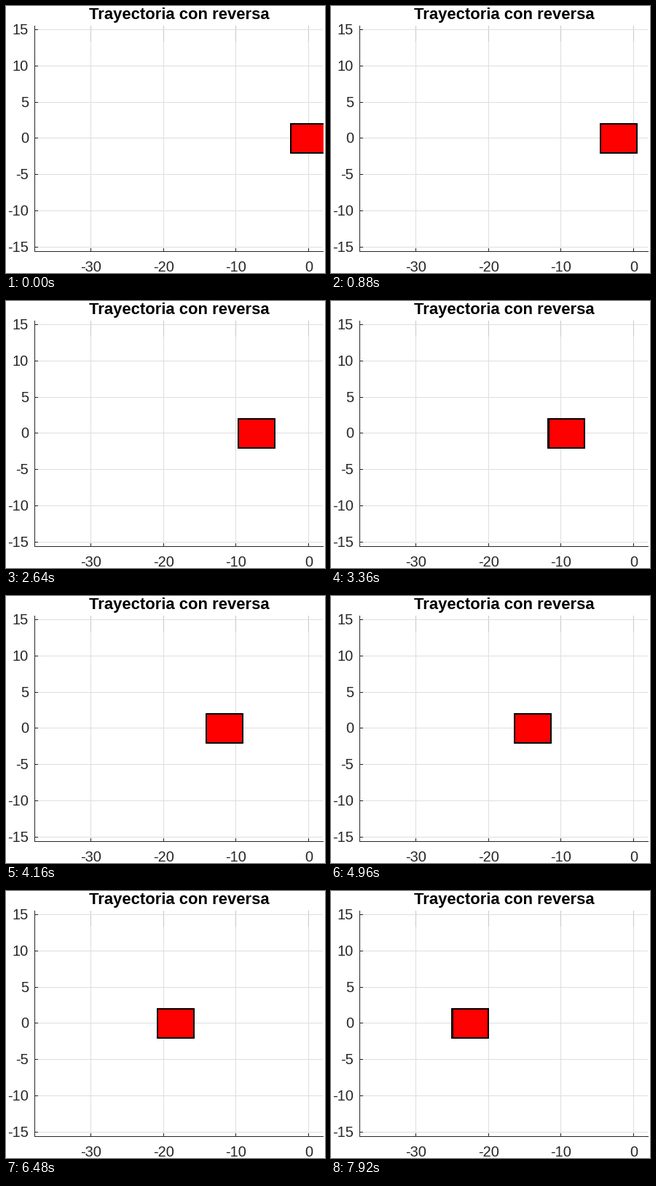
Write a matplotlib script that moves like this. It is 438 by 367 pixels and loops after 8000 ms.

```python
from math import floor

import matplotlib.pyplot as plt
from matplotlib.animation import FuncAnimation
from matplotlib.patches import Rectangle

W, H, DPI = 438, 367, 64
PT = 72 / DPI                      # points per pixel
FRAMES, INTERVAL = 100, 80
SCALE = 9.97                       # pixels per data unit
LEFT, TOP, RIGHT, BOTTOM = 39, 27, 435, 337
INK, GRID, GRID_TOP = "#262626", "#dedede", "#c8c8c8"
CAR_X, CAR_Y = 415.95, 182.14      # screen position of the car at the start
CAR_W, CAR_H = 5 * SCALE, 4 * SCALE
STEP = 23 / 99 * SCALE             # 23 units of reverse in 99 steps

plt.rcParams["font.family"] = "Liberation Sans"
fig = plt.figure(figsize=(W / DPI, H / DPI), dpi=DPI, facecolor="white")
ax = fig.add_axes([0, 0, 1, 1])
ax.set_xlim(0, W)
ax.set_ylim(H, 0)
ax.axis("off")


def bar(x, y, w, h, color, z):
    ax.add_patch(Rectangle((x, y), w, h, fc=color, lw=0,
                           antialiased=False, zorder=z))


def label(x, y, text, size=20, color=INK, **kw):
    ax.text(x, y, text, fontsize=size * PT, color=color, va="baseline", **kw)


for v in range(-30, 1, 10):
    x = floor(415.5 + v * SCALE)
    bar(x, TOP, 1, BOTTOM - TOP, GRID, 1)
    bar(x, TOP, 1, 22, GRID_TOP, 1)
    bar(x, BOTTOM - 4, 1, 4, INK, 4)
    label(x + 0.5, 365, str(v), ha="center")

for v in range(-15, 16, 5):
    y = floor(181.9 - v * SCALE)
    bar(LEFT, y, RIGHT - LEFT, 1, GRID, 1)
    bar(LEFT, y, 5, 1, INK, 4)
    label(31, y + 7, str(v), ha="right")

bar(LEFT, TOP, 1, BOTTOM - TOP + 1, INK, 4)
bar(LEFT, BOTTOM, RIGHT - LEFT + 1, 1, INK, 4)
label(238, 18, "Trayectoria con reversa", 22, "black",
      ha="center", weight="bold")

car = Rectangle((0, CAR_Y - CAR_H / 2), CAR_W, CAR_H, fc="red", ec="black",
                lw=1.333 * PT, antialiased=False, snap=False, zorder=3)
ax.add_patch(car)
car.set_clip_path(Rectangle((LEFT, TOP), RIGHT + 1 - LEFT, BOTTOM - TOP,
                            transform=ax.transData))


def update(i):
    car.set_x(CAR_X - CAR_W / 2 - STEP * max(0, i - 2))
    return (car,)


anim = FuncAnimation(fig, update, frames=FRAMES, init_func=lambda: update(0),
                     interval=INTERVAL, repeat=True, repeat_delay=0)
plt.show()
```
